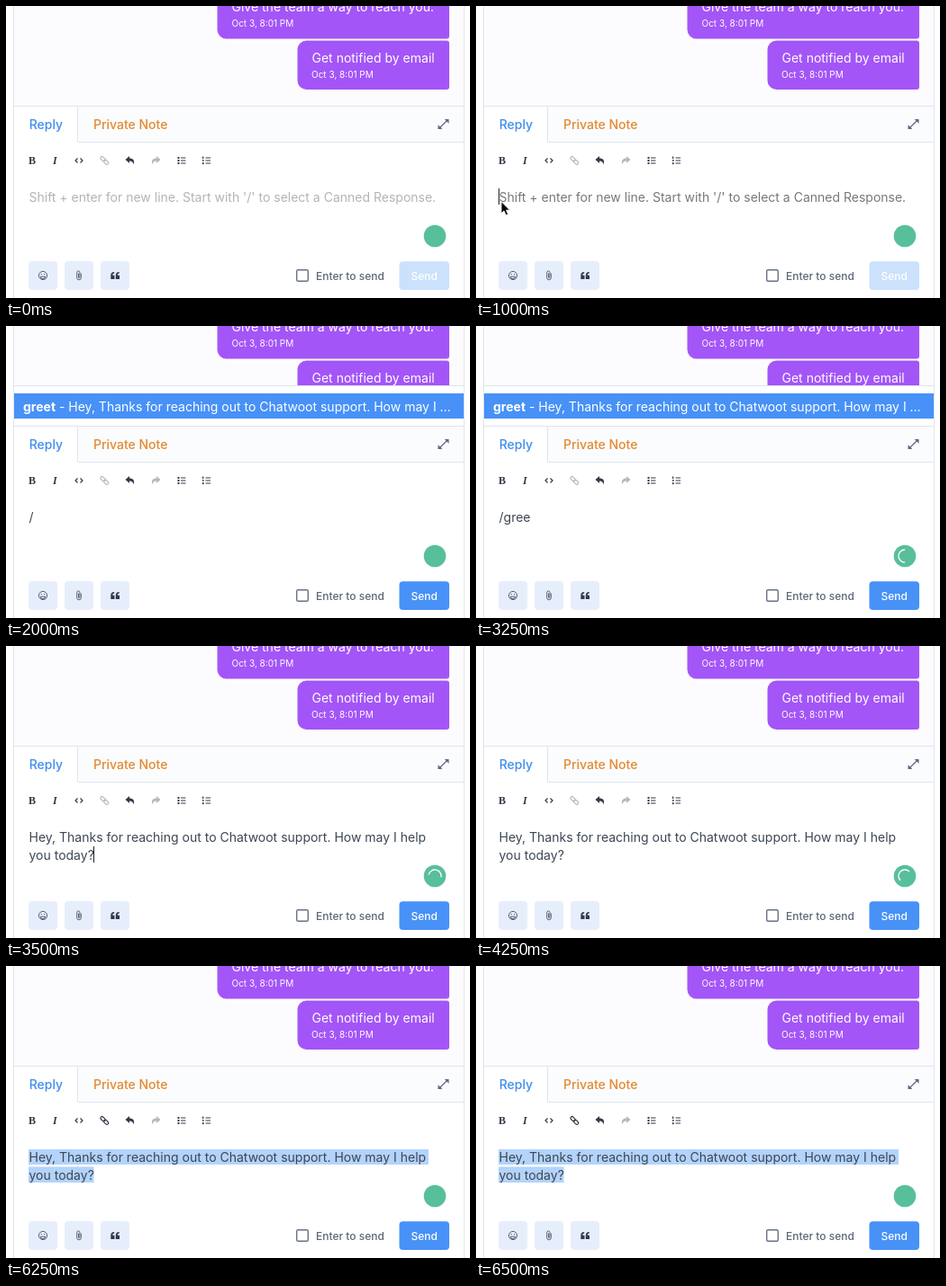
Recreate the animation shown at these times as an HTML page. Size 515x325 px, loop 7500 ms.

```html
<!DOCTYPE html>
<html lang="en">
<head>
<meta charset="utf-8">
<title>Canned response</title>
<style>
  html, body { margin: 0; width: 100%; height: 100%; overflow: hidden; background: #fff; }
  svg { display: block; width: 515px; height: 325px; }
  text { font: 14px Inter, sans-serif; white-space: pre; }
  .date { font-size: 10px; }
  .small { font-size: 12px; font-weight: 500; }
  .tab { font-weight: 500; }
  .serif { font: bold 12px "Liberation Serif", serif; }
  .italic { font-style: italic; }
  .white { fill: #fff; }
  .bubble { fill: #a355f7; }
  .blue { fill: #4791f7; }
  .line { fill: none; stroke: #e0e5ef; }
  .ink { fill: #2f3a4b; }
  .stroke { fill: none; stroke: #2f3a4b; stroke-width: 1.2; }
  .thin { fill: none; stroke: #48546a; stroke-width: .9; }
  .body { fill: #3c4654; }
</style>
</head>
<body>
<svg viewBox="0 0 515 325">
  <!-- conversation -->
  <rect x="9" width="499" height="111" fill="#fcfcfe"/>
  <path class="bubble" d="M234.500-20H492V33.500a3 3 0 0 1-3 3H244.500a10 10 0 0 1-10-10z"/>
  <path class="bubble" d="M333.500 38.500H489a3 3 0 0 1 3 3V90a3 3 0 0 1-3 3H333.500a10 10 0 0 1-10-10V48.500a10 10 0 0 1 10-10z"/>
  <g class="white">
    <text x="250.500" y="6">Give the team a way to reach you.</text>
    <text class="date" x="250.500" y="23">Oct 3, 8:01 PM</text>
    <text x="339.500" y="63">Get notified by email</text>
    <text class="date" x="339" y="80">Oct 3, 8:01 PM</text>
  </g>

  <g id="popup">
    <rect class="white" x="9" y="66" width="499" height="46"/>
    <path class="line" d="M9 66.500H508"/>
    <rect class="blue" x="9" y="75" width="499" height="28"/>
    <text class="white" x="19" y="95"><tspan font-weight="700">greet</tspan> - Hey, Thanks for reaching out to Chatwoot support. How may I …</text>
  </g>

  <!-- reply box -->
  <rect class="white" x="9" y="112" width="499" height="213"/>
  <rect x="80" y="112" width="428" height="39" fill="#fafcfe"/>
  <path class="line" d="M9 111.500H508M79.500 112V151.500H508M8.500 0V325M508.500 0V325"/>
  <text class="tab" x="25.700" y="137" fill="#3d8df2">Reply</text>
  <text class="tab" x="97" y="137" fill="#e5892d">Private Note</text>
  <g fill="#5a6983">
    <path d="M481 136L490 127" stroke="#5a6983" stroke-width="1.300"/>
    <path d="M486.700 126h4.800v4.800zM479.500 132.200v4.800h4.800z"/>
  </g>

  <!-- toolbar -->
  <g class="ink">
    <text class="serif" x="25" y="176">B</text>
    <text class="serif italic" x="52" y="176">I</text>
    <path id="undo" d="M132.500 171L137 167v2.400c4 0 6.400 2.300 4.300 7-.2-2.800-1.500-4-4.300-4V175z"/>
    <use href="#undo" transform="translate(304) scale(-1 1)" opacity=".35"/>
    <path d="M190.500 168h2v2h-2zm0 3h2v2h-2zm0 3h2v2h-2z"/>
    <path d="M218 167.500h1.300v2.500h-1.300zm0 3.500h1.500v1.700h-1.500zm0 3h1.500v2.200h-1.500z"/>
  </g>
  <g class="stroke">
    <path d="M79.500 169.500L77 172l2.500 2.500M82.500 169.500L85 172l-2.500 2.500"/>
    <path d="M194 169h5.500m-5.500 3h5.500m-5.500 3h5.500M221.500 169h5.500m-5.500 3h5.500m-5.500 3h5.500"/>
    <g id="link" transform="translate(109.300 172) rotate(45)">
      <rect x="-5.500" y="-1.700" width="6" height="3.400" rx="1.700"/>
      <rect x="-.5" y="-1.700" width="6" height="3.400" rx="1.700"/>
    </g>
  </g>

  <!-- editor -->
  <path id="selection" fill="#b3d3fa" d="M25 204H469v17H25zM25 223.500H97.500v17.500H25z"/>
  <text id="hint" x="25.500" y="218">Shift + enter for new line. Start with '/' to select a Canned Response.</text>
  <text id="first" class="body" x="25.500" y="218"></text>
  <text id="second" class="body" x="25.500" y="238"></text>
  <rect id="caret" width="1" height="18" fill="#222"/>
  <circle cx="476" cy="256" r="12.300" fill="#58bf9b"/>
  <path id="spinner" d="M476 249a7 7 0 0 0 0 14" fill="none" stroke="#fff" stroke-width="1.300"/>

  <!-- footer -->
  <path id="key" fill="#e7eefb" d="M29 284h24a4 4 0 0 1 4 4v24a4 4 0 0 1-4 4H29a4 4 0 0 1-4-4V288a4 4 0 0 1 4-4z"/>
  <use href="#key" x="40"/>
  <use href="#key" x="80"/>
  <g class="thin">
    <circle cx="41" cy="300" r="4.600"/>
    <path d="M38.300 301.200h5.400a2.700 2.500 0 0 1-5.400 0z"/>
    <path d="M39.300 298v1.200M42.700 298v1.200"/>
    <path d="M83.300 297.500v5a2.300 2.300 0 0 1-4.600 0v-6a1.600 1.600 0 0 1 3.200 0v5.500a.7.7 0 0 1-1.400 0V297.500"/>
  </g>
  <g class="ink">
    <path id="quote" d="M116.300 304v-4c0-2.600 1.200-4 3.900-4v1.500c-1.300 0-1.900.7-1.900 2.300h2.200v4.200z"/>
    <use href="#quote" x="5.500"/>
  </g>
  <rect x="322.700" y="293.700" width="12.600" height="12.600" rx="1.500" fill="#fff" stroke="#66738a" stroke-width="1.400"/>
  <text class="small" x="344" y="304.500" fill="#5a6678">Enter to send</text>
  <rect id="send" x="436.500" y="284.200" width="55.500" height="31.800" rx="4"/>
  <text class="small white" x="464.200" y="304.500" text-anchor="middle">Send</text>

  <path id="pointer" d="M0 0V13.500l3.100-2.900 2.100 4.900 2.500-1.100-2.100-4.700h4.100z" fill="#000" stroke="#fff"/>
</svg>
<script>
const LOOP = 7500, STEP = 250;
const $ = id => document.getElementById(id);
const within = (t, from, to) => t >= from && t < to;
const show = (id, on) => $(id).setAttribute('visibility', on ? 'visible' : 'hidden');

const typed = [
  [0, ''], [2000, '/'], [2250, '/g'], [2500, '/gre'], [2750, '/gree'],
  [3500, 'Hey, Thanks for reaching out to Chatwoot support. How may I help', 'you today?']
];
const pointer = [[250, 47, 122], [500, 38, 147], [750, 28, 215], [1000, 28, 217.5]];
// start, end, x, y
const carets = [
  [1000, 1500, 25, 203], [2250, 2500, 38, 203], [2500, 2750, 51, 203], [2750, 3250, 60, 203],
  [3500, 3750, 97, 223], [4500, 5000, 97, 223]
];
const latest = (list, t) => list.findLast(k => t >= k[0]);

function draw(t) {
  const [, first, second = ''] = latest(typed, t);
  $('first').textContent = first;
  $('second').textContent = second;
  show('hint', !first);
  $('hint').setAttribute('fill', t < 1000 ? '#b2b4b7' : '#76787c');
  $('send').setAttribute('fill', first ? '#4791f7' : '#cce1fc');

  show('popup', within(t, 2000, 3500));
  show('selection', t >= 5250);
  $('link').setAttribute('opacity', t >= 5250 ? 1 : .35);

  const caret = carets.find(c => within(t, c[0], c[1]));
  show('caret', caret);
  if (caret) {
    $('caret').setAttribute('x', caret[2]);
    $('caret').setAttribute('y', caret[3]);
  }

  show('pointer', within(t, 250, 2000));
  const spot = latest(pointer, t);
  if (spot) $('pointer').setAttribute('transform', `translate(${spot[1]} ${spot[2]})`);

  show('spinner', within(t, 2250, 5250));
  $('spinner').setAttribute('transform', `rotate(${(t - 3250) * .405} 476 256)`);
}

const start = performance.now();
function tick() {
  const t = (performance.now() - start) % LOOP;
  draw(Math.floor(t / STEP) * STEP);
  requestAnimationFrame(tick);
}
tick();
</script>
</body>
</html>
```
